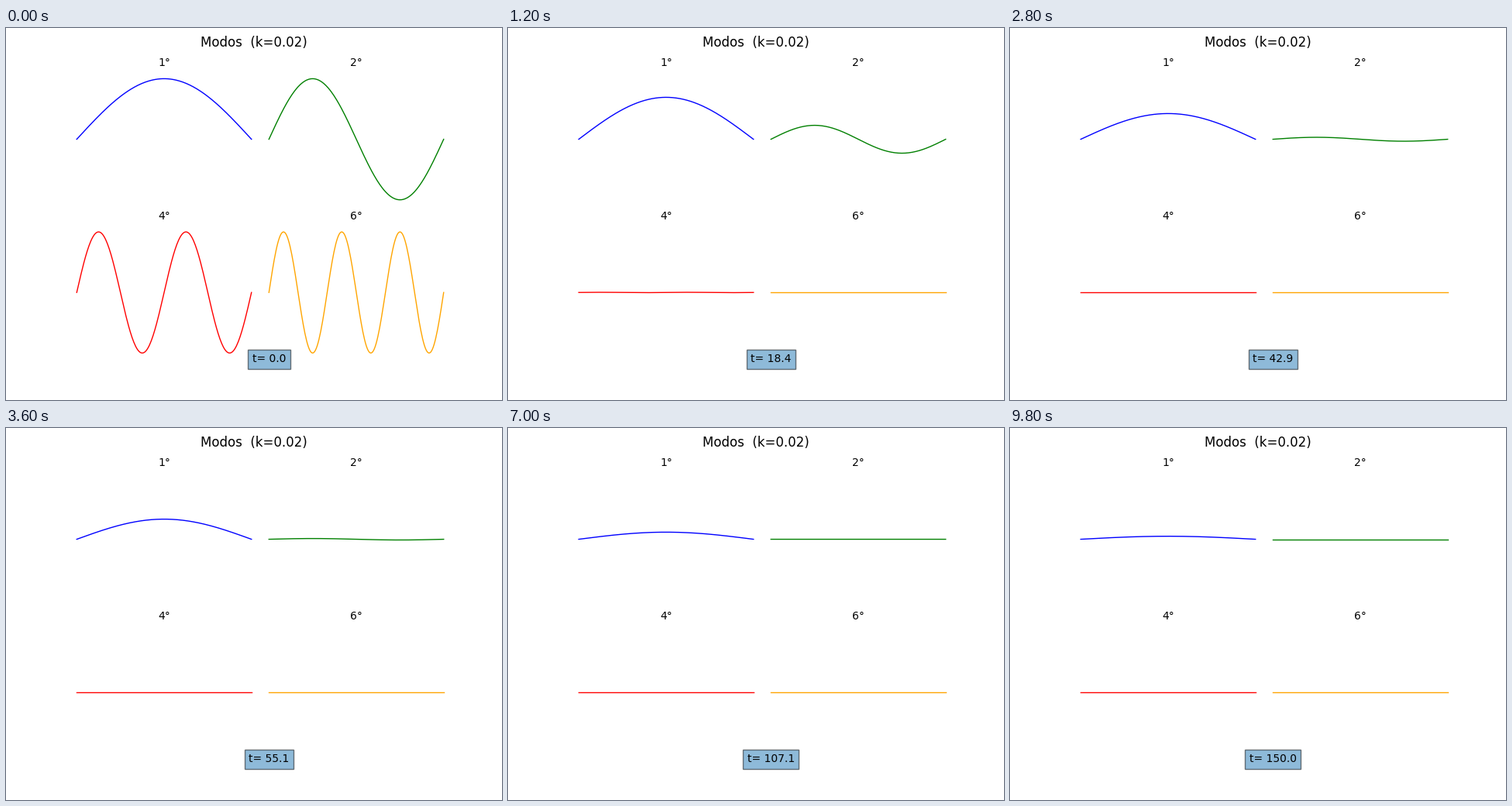
Recreate the animation shown at these times as a matplotlib script. Size 640 px wide and 480 px high, loop 10 s.

```python
import numpy as np
import matplotlib.pyplot as plt
from matplotlib.animation import FuncAnimation

K = 0.02
MODES = [(1, "blue"), (2, "green"), (4, "red"), (6, "orange")]
TIMES = np.linspace(0, 150, 50)

plt.rcParams["font.family"] = "DejaVu Sans"
x = np.linspace(0, 1, 200)


def mode(n, t):
    """Standing sine mode n, decaying at the rate K * n**2."""
    return np.sin(n * np.pi * x) * np.exp(-K * n**2 * t)


fig, axes = plt.subplots(2, 2, figsize=(6.4, 4.8), dpi=100)
fig.subplots_adjust(left=0.125, right=0.9, bottom=0.11, top=0.88,
                    wspace=0, hspace=0.15)
fig.suptitle(f"Modos  (k={K})", fontsize=12)

lines = []
for ax, (n, color) in zip(axes.flat, MODES):
    ax.set_title(f"{n}°", fontsize=10)
    ax.set_xlim(-0.05, 1.05)
    ax.set_ylim(-1.1, 1.1)
    ax.axis("off")
    lines += ax.plot(x, mode(n, 0), color=color, lw=1)

clock = axes[1, 1].text(0, -1.1, "", fontsize=10, ha="center", va="center",
                        bbox=dict(facecolor="tab:blue", edgecolor="black",
                                  alpha=0.5))


def update(i):
    t = TIMES[i]
    for line, (n, _) in zip(lines, MODES):
        line.set_ydata(mode(n, t))
    clock.set_text(f"t= {t:.1f}")
    return [*lines, clock]


anim = FuncAnimation(fig, update, frames=len(TIMES), interval=200,
                     repeat=True, repeat_delay=0)
plt.show()
```
